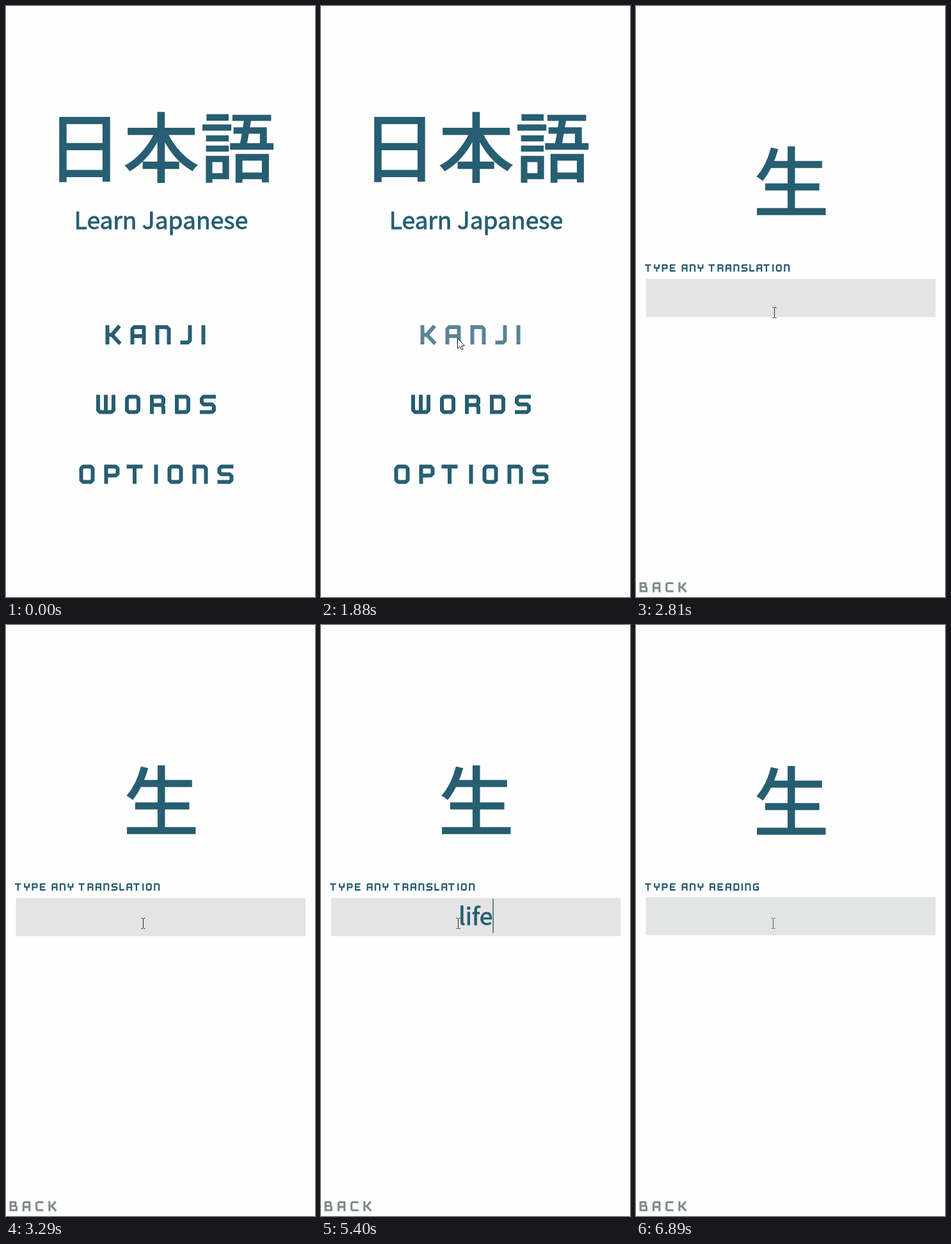
An HTML page for the animation above (8000 ms loop, 483 by 922 pixels).

```html
<!DOCTYPE html>
<html lang="ja">
<head>
<meta charset="utf-8">
<title>Learn Japanese</title>
<style>
  html, body { margin: 0; width: 100%; height: 100%; overflow: hidden; background: #fefefe; }
  svg { display: block; width: 100%; height: 100%; --ink: #275e72; }
  text {
    font-family: "Noto Sans CJK JP", "Noto Sans CJK", sans-serif;
    font-weight: 400; text-anchor: middle; fill: var(--ink); stroke: var(--ink);
  }
  .kanji { font-size: 117.5px; stroke-width: 2.4px; stroke-linejoin: miter; }
  .title { letter-spacing: 2.5px; }
  .latin { font-size: 37.2px; stroke-width: .9px; }
  .lettering { fill: none; stroke: var(--ink); stroke-width: 6px; stroke-linejoin: round; }
</style>
</head>
<body>
<svg viewBox="0 0 483 922">
  <g id="menu">
    <text class="kanji title" x="243.7" y="265.3">日本語</text>
    <text class="latin" x="242.5" y="348">Learn Japanese</text>
  </g>
  <g id="quiz">
    <text class="kanji" id="question" x="242.5" y="318.7">生</text>
    <rect id="field" x="15.5" width="452.8" height="59.7"/>
    <text class="latin" id="answer" x="241.8" y="468"></text>
    <rect id="caret" y="427" width="1.4" height="53.5" fill="#275e72"/>
  </g>
  <path id="arrow" d="M.5 .5V16.5L4.2 13L6.7 18.5L9 17.5L6.6 12H11.5Z" fill="#fff" stroke="#1b1f2b"/>
  <path id="beam" d="M-3 -8H-1L0 -7L1 -8H3M0 -7V7M-3 8H-1L0 7L1 8H3" fill="none"/>
</svg>
<script>
const LOOP = 8000, QUIZ_START = 2030, READING_START = 6890;
const $ = id => document.getElementById(id);

// Square display lettering: [width, centre-line path], 30 units high.
const GLYPHS = {
  A: [24, 'M3 30V6L6 3H21V30M3 17H21'],
  B: [24, 'M0 3H18V14H3M18 14L21 17V27H0M3 3V27'],
  C: [24, 'M24 3H6L3 6V24L6 27H24'],
  D: [24, 'M0 3H18L21 6V24L18 27H0M3 3V27'],
  E: [24, 'M23 3H3V27H23M3 15H20'],
  G: [24, 'M24 3H6L3 6V24L6 27H21V15H12'],
  I: [6, 'M3 0V30'],
  J: [18, 'M15 0V24L12 27H0'],
  K: [24, 'M3 0V30M3 15H10L22 1M10 15L23 29'],
  L: [20, 'M3 0V27H20'],
  N: [24, 'M0 3H18L21 6V30M3 3V30'],
  O: [24, 'M6 3H18L21 6V24L18 27H6L3 24V6Z'],
  P: [24, 'M0 3H18L21 6V14L18 17H3M3 3V30'],
  R: [24, 'M0 3H18L21 6V13L18 16H3M18 16L21 19V30M3 3V30'],
  S: [24, 'M25 3H6L3 6V12L6 15H19L22 18V24L19 27H0'],
  T: [24, 'M-4 3H21M8.5 3V30'],
  W: [30, 'M3 0V24L6 27H24L27 24V0M15 0V27'],
  Y: [24, 'M3 0V15H21V0M12 15V30']
};

function lettering(parent, text, x, y, scale = 1, gap = 15, color = '') {
  const ns = 'http://www.w3.org/2000/svg';
  const group = document.createElementNS(ns, 'g');
  group.setAttribute('class', 'lettering');
  group.setAttribute('role', 'img');
  group.setAttribute('aria-label', text);
  group.setAttribute('transform', `translate(${x} ${y}) scale(${scale})`);
  group.style.stroke = color;
  let pen = 0;
  for (const char of text) {
    if (char === ' ') { pen += 16; continue; }
    const [width, d] = GLYPHS[char];
    const path = document.createElementNS(ns, 'path');
    path.setAttribute('d', d);
    path.setAttribute('transform', `translate(${pen} 0)`);
    group.append(path);
    pen += width + gap;
  }
  $(parent).append(group);
  return group;
}

const kanjiButton = lettering('menu', 'KANJI', 155.5, 498);
lettering('menu', 'WORDS', 141, 606.5);
lettering('menu', 'OPTIONS', 114.5, 715.5);
const translationLabel = lettering('quiz', 'TYPE ANY TRANSLATION', 15.5, 403, .38, 8.8);
const readingLabel = lettering('quiz', 'TYPE ANY READING', 15.5, 403, .38, 8.8);
lettering('quiz', 'BACK', 5.5, 899, .52, 15, '#7f8b8e');

// Pointer samples: time, x, y.
const POINTER = [
  [760, 471, 387], [840, 434, 389], [920, 400, 394], [1000, 364, 403],
  [1080, 337, 414], [1160, 300, 429], [1240, 264, 445], [1320, 233, 461],
  [1400, 219, 497], [1480, 214, 522], [1560, 213, 514], [1640, 213, 518],
  [2650, 214, 510], [2730, 215, 495], [2810, 216, 478], [2890, 219, 466],
  [2970, 223, 470], [3210, 201, 457], [3290, 214, 465]
];
const BEAM_START = 2810;
const KEYS = [4610, 4850, 5240, 5400];
const FIELD_COLORS = [[0, '#e4e4e4'], [5950, '#d8e8d8'], [6030, '#cdebcd'], [READING_START, '#e3e5e4']];

const latest = (steps, t) => steps.filter(step => step[0] <= t).pop();
const show = (element, on) => element.setAttribute('display', on ? 'inline' : 'none');

function render(t) {
  const reading = t >= READING_START;
  show($('menu'), t < QUIZ_START);
  show($('quiz'), t >= QUIZ_START);
  kanjiButton.style.stroke = t >= 1880 ? '#5a8494' : '';

  show(translationLabel, !reading);
  show(readingLabel, reading);
  $('question').setAttribute('y', reading ? 319.9 : 318.7);
  $('field').setAttribute('y', reading ? 424.3 : 425.7);
  $('field').setAttribute('fill', latest(FIELD_COLORS, t)[1]);

  const typed = reading ? 0 : KEYS.filter(key => key <= t).length;
  const answer = $('answer');
  answer.textContent = 'life'.slice(0, typed);
  const typing = typed > 0 && t < 5950;
  show($('caret'), typing);
  if (typing) $('caret').setAttribute('x', 241.8 + answer.getComputedTextLength() / 2);

  const pointer = latest(POINTER, t);
  const inField = t >= BEAM_START;
  show($('arrow'), pointer && !inField);
  show($('beam'), inField);
  $('beam').setAttribute('stroke', reading ? '#2f5f78' : '#222');
  if (pointer) {
    const [, x, y] = pointer;
    $('arrow').setAttribute('transform', `translate(${x} ${y})`);
    $('beam').setAttribute('transform', `translate(${x + .5} ${y + .5})`);
  }
}

const start = performance.now();
function tick() {
  render((performance.now() - start) % LOOP);
  requestAnimationFrame(tick);
}
tick();
</script>
</body>
</html>
```
